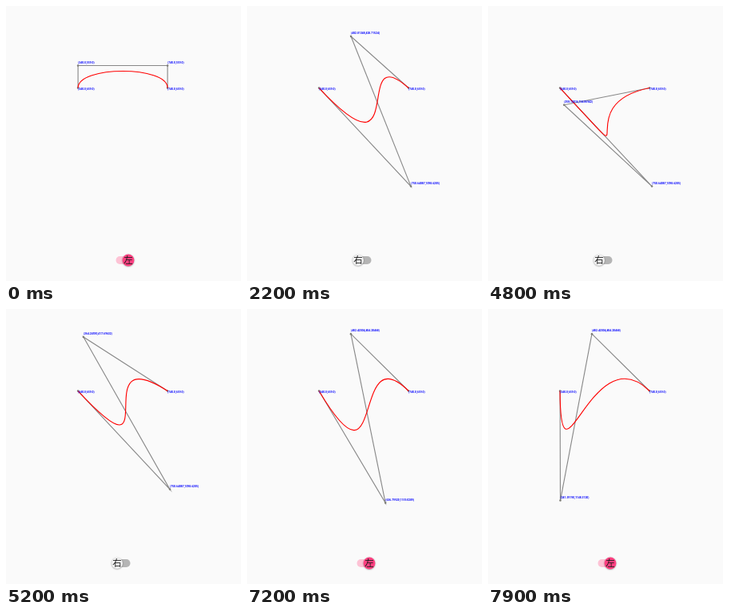
Recreate the animation shown at these times as an HTML page with a canvas. Size 294 by 344 pixels, loop 8000 ms.

```html
<!DOCTYPE html>
<html lang="zh">
<head>
<meta charset="utf-8">
<title>Cubic Bézier</title>
<style>
html, body { margin: 0; width: 294px; height: 344px; overflow: hidden; background: #fafafa; }
canvas { display: block; width: 294px; height: 344px; }
</style>
</head>
<body>
<canvas id="stage"></canvas>
<script>
const LOOP = 8000, STEP = 100, W = 294, H = 344;
const SCALE = 0.28, OFF_X = -5.1, OFF_Y = -82;
const START = [340, 659], END = [740, 659];
const TOP_LEFT = [340, 559], TOP_RIGHT = [740, 559];
const LOW_RIGHT = [750.64087, 1098.6205], TOP = [482.42004, 404.20468];
const TOUCH = [725.47192, 1091.4364], TURN = [611.41284, 1126.8647];
const LIFT = [390.28564, 394.71436], NUDGE = [397.14258, 402.15283];

// Drags follow a Bézier path; a single point is a jump.
const move = (from, to, ...path) => ({ from, to, path });
const LEFT = [
  move(0, 0, TOP_LEFT),
  move(500, 500, LOW_RIGHT),
  move(7200, 7900, [636.7992, 1159.0289], [450, 1185], [115, 1165], [341.3919, 1148.312]),
];
const RIGHT = [
  move(0, 0, TOP_RIGHT),
  move(2200, 2200, [482.81348, 428.71524]),
  move(4000, 4300, TOUCH, [668, 1150], TURN),
  move(4400, 5300, TURN, [290, 900], [302.8, 415], LIFT),
  move(5400, 5400, NUDGE),
  move(5600, 5800, NUDGE, TOP),
];

const canvas = document.getElementById('stage');
const ctx = canvas.getContext('2d');
const ratio = window.devicePixelRatio || 1;
canvas.width = W * ratio;
canvas.height = H * ratio;

const clamp = u => Math.min(1, Math.max(0, u));
const smooth = u => u * u * (3 - 2 * u);
const lerp = (a, b, u) => a.map((v, i) => v + (b[i] - v) * u);
const rgb = (c, alpha = 1) => `rgba(${c.map(Math.round)},${alpha})`;
const format = v => (Number.isInteger(v) ? v.toFixed(1) : v.toPrecision(8));

function along(path, u) {
  if (u === 0 || path.length === 1) return path[0];
  if (u === 1) return path[path.length - 1];
  return along(path.slice(1).map((p, i) => lerp(path[i], p, u)), u);
}

function handleAt(moves, t) {
  const { from, to, path } = moves.filter(m => m.from <= t).pop();
  return along(path, to > from ? clamp((t - from) / (to - from)) : 0);
}

function disc(x, y, r, fill) {
  ctx.fillStyle = fill;
  ctx.beginPath();
  ctx.arc(x, y, r, 0, 7);
  ctx.fill();
}

function label([x, y], dy) {
  ctx.font = 'bold 12px Roboto, "Liberation Sans", sans-serif';
  ctx.textAlign = 'left';
  ctx.fillStyle = '#0000ff';
  ctx.fillText(`(${format(x)},${format(y)})`, x, y + dy);
}

function drawCurve(c1, c2) {
  const points = [START, c1, c2, END];
  ctx.save();
  ctx.translate(OFF_X, OFF_Y);
  ctx.scale(SCALE, SCALE);

  ctx.strokeStyle = '#888';
  ctx.lineWidth = 4;
  ctx.beginPath();
  points.forEach(p => ctx.lineTo(...p));
  ctx.stroke();
  points.forEach(p => disc(...p, 4.5, '#7c7c74'));

  ctx.strokeStyle = '#ff0000';
  ctx.beginPath();
  ctx.moveTo(...START);
  ctx.bezierCurveTo(...c1, ...c2, ...END);
  ctx.stroke();

  label(START, 10);
  label(END, 10);
  label(c1, -10);
  label(c2, -10);
  ctx.restore();
}

const PINK = [255, 64, 129], LIGHT = [241, 241, 241];
const OFF_AT = 1600, ON_AT = 6500, SLIDE = 400;

function drawSwitch(t) {
  const y = 318;
  const turnedOn = t < OFF_AT + STEP || t > ON_AT;
  const u = clamp((t - (t < ON_AT ? OFF_AT : ON_AT)) / SLIDE);
  const level = t < ON_AT ? 1 - smooth(u) : smooth(u);
  const x = 139 + 14 * level;
  const colour = lerp(LIGHT, PINK, level);

  ctx.fillStyle = turnedOn && t !== OFF_AT + STEP ? '#fdc3d5' : '#b5b5b5';
  ctx.beginPath();
  ctx.roundRect(137.5, y - 5, 18, 10, 5);
  ctx.fill();
  if (u > 0 && u < 1) disc(x, y, 14, rgb(lerp([0, 0, 0], PINK, level), 0.25 * (1 - u) ** 2));

  ctx.save();
  ctx.shadowColor = 'rgba(0,0,0,0.4)';
  ctx.shadowBlur = 2 * ratio;
  ctx.shadowOffsetY = 0.5 * ratio;
  disc(x, y, 7 + 0.4 * level, rgb(colour));
  ctx.restore();

  ctx.font = '300 11.5px "Noto Sans CJK SC", "Noto Sans CJK JP", "Noto Sans CJK", sans-serif';
  ctx.textAlign = 'center';
  ctx.fillStyle = '#1c1c1c';
  ctx.fillText(level >= 0.5 ? '左' : '右', x, y + 4.3);
}

function draw(time) {
  const t = Math.floor(time / STEP) * STEP;
  ctx.setTransform(ratio, 0, 0, ratio, 0, 0);
  ctx.fillStyle = '#fafafa';
  ctx.fillRect(0, 0, W, H);
  drawCurve(handleAt(LEFT, t), handleAt(RIGHT, t));
  drawSwitch(t);
}

const begin = performance.now();
function tick() {
  draw((performance.now() - begin) % LOOP);
  requestAnimationFrame(tick);
}
tick();
</script>
</body>
</html>
```
